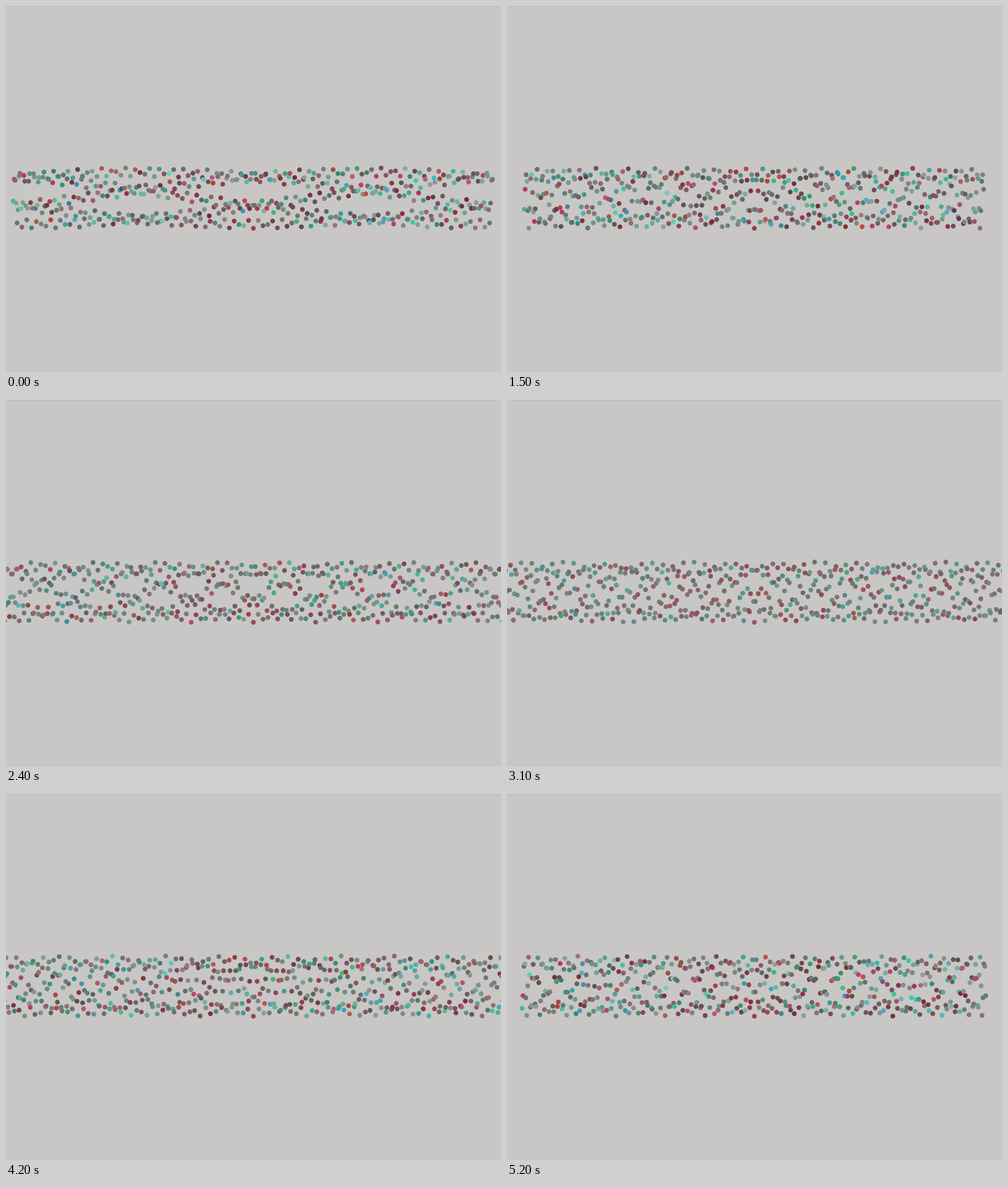
Animation of 871 by 643 pixels, one loop 5.3 s. Source, as an HTML page with a canvas:

```html
<!DOCTYPE html>
<html>
<head>
<meta charset="utf-8">
<style>
  html, body { margin: 0; width: 100%; height: 100%; overflow: hidden; background: #c8c7c5; }
  canvas { display: block; }
</style>
</head>
<body>
<canvas id="stage" width="871" height="643"></canvas>
<script>
const ctx = document.getElementById('stage').getContext('2d');
const LOOP = 5.3, STEP = 0.1, MID_X = 435.3, MID_Y = 337.5, MAX = 300;
const RIPPLE = 101.4; // degrees per dot of the small second wave

// key points: seconds, degrees per dot, pixels per dot
const poses = [
  [0, 71.7, 1.69], [.7, 102.8, 1.727], [1.5, 61.7, 1.62], [2.4, 73.16, 1.71],
  [3.8, 60.3, 1.71], [4.6, 66, 1.575], [5.2, 74.88, 1.635], [LOOP, 71.7, 1.69]
];

function poseAt(t) {
  const k = Math.max(1, poses.findIndex(p => p[0] >= t));
  const a = poses[k - 1], b = poses[k];
  const u = (t - a[0]) / (b[0] - a[0]);
  return [1, 2].map(i => a[i] + (b[i] - a[i]) * u);
}

const bell = (distance, width) => Math.exp(-((distance / width) ** 2));
const cosDeg = a => Math.cos(a * Math.PI / 180);

// The row is shortest at 0.7 s; dots come and go in groups.
function halfCount(t) {
  const d = Math.abs(t - 0.7);
  return 25 * Math.round((MAX - 125 * bell(Math.min(d, LOOP - d), 0.74)) / 25);
}

let seed = 11;
function random() {
  seed = (seed * 16807) % 2147483647;
  return seed / 2147483647;
}

// Reds and teals, with some muted in-between tones
const colors = Array.from({ length: MAX * 2 }, () => {
  const red = random() < 0.47;
  const hue = (red ? 350 : 170) + (random() - 0.5) * 44;
  const sat = 4 + 52 * random() ** 1.6;
  const light = (red ? 31 : 37) + 23 * random();
  return { hue, sat, light };
});

function draw(t) {
  ctx.fillStyle = '#c8c7c5';
  ctx.fillRect(0, 0, 871, 643);
  ctx.fillStyle = '#b7b6b4';
  ctx.fillRect(0, 0, 871, 1);
  ctx.fillStyle = '#bfbebc';
  ctx.fillRect(0, 642, 871, 1);

  const [turn, gap] = poseAt(t), half = halfCount(t);
  const dull = 0.65 * bell(t - 3.1, 1);
  for (let m = -half; m < half; m++) {
    const { hue, sat, light } = colors[m + MAX];
    const y = MID_Y + 45.5 * cosDeg(turn * m) + 7.5 * cosDeg(RIPPLE * m);
    ctx.fillStyle = `hsl(${hue}, ${sat * (1 - dull / 2)}%, ${light + (47 - light) * dull}%)`;
    ctx.beginPath();
    ctx.arc(MID_X + m * gap, y, 4.2, 0, Math.PI * 2);
    ctx.fill();
  }
}

function frame() {
  const t = performance.now() / 1000 % LOOP;
  draw(Math.floor(t / STEP) * STEP);
  requestAnimationFrame(frame);
}
frame();
</script>
</body>
</html>
```
